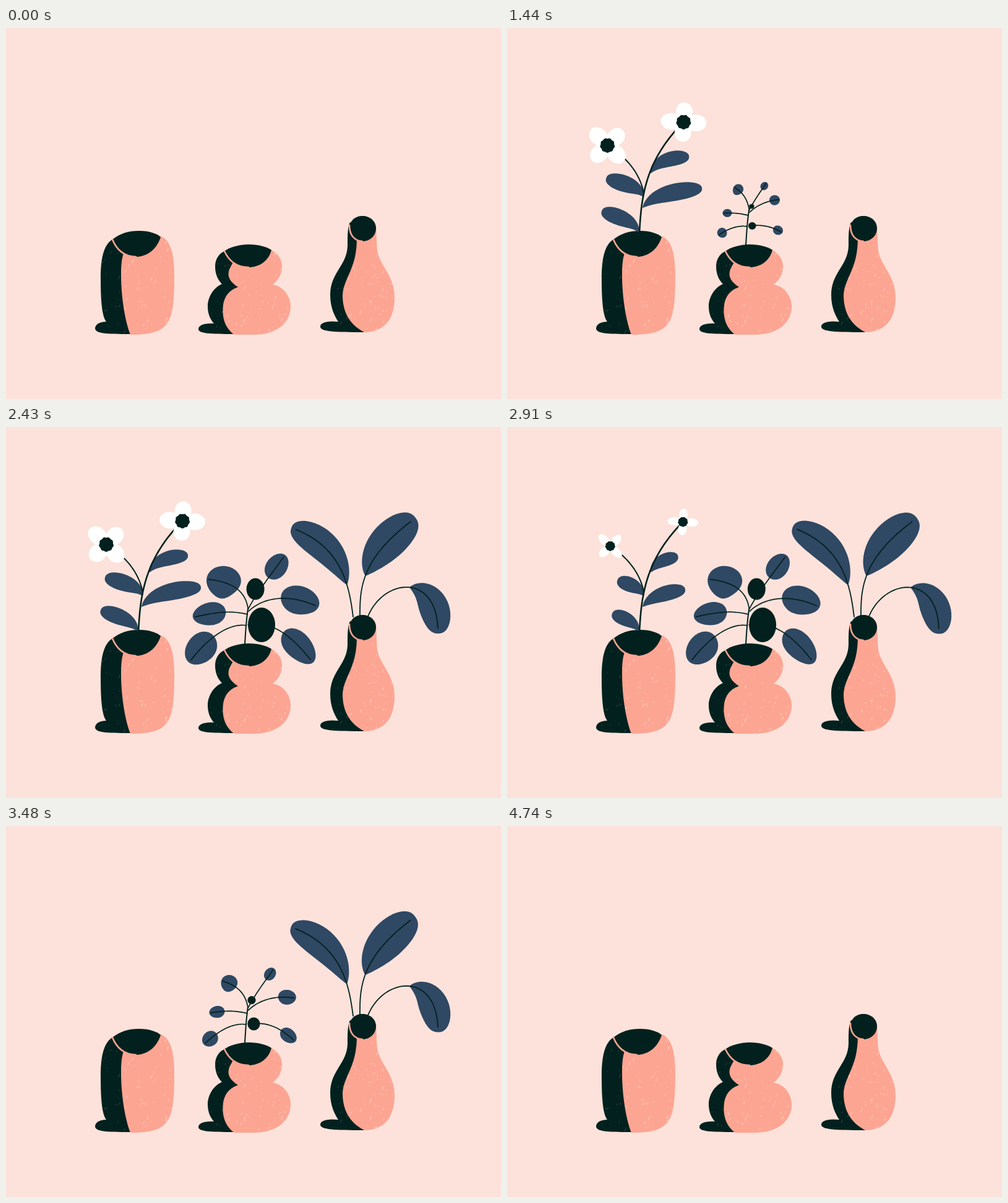
Animation, 800 px wide and 600 px high, one loop 4770 ms. Source, as an HTML page with a canvas:

```html
<!DOCTYPE html>
<html lang="en">
<head>
<meta charset="utf-8">
<title>Three vases</title>
<style>
html, body { margin: 0; width: 100%; height: 100%; overflow: hidden; background: #fce2da; }
canvas { display: block; width: 800px; height: 600px; }
</style>
</head>
<body>
<canvas id="stage" width="800" height="600"></canvas>
<script>
const ctx = document.getElementById('stage').getContext('2d');
const LOOP = 4770;
const CREAM = '#fce2da', DARK = '#02211e', PINK = '#fda593', BLUE = '#2f4863', WHITE = '#fff';

const clamp = x => Math.max(0, Math.min(1, x));
const ease = x => { x = clamp(x); return x * x * (3 - 2 * x); };
const mix = (a, b, k) => a + (b - a) * k;

// Rises from 0 to 1, holds, then falls back to 0.
const phase = (t, inAt, inFor, outAt, outFor) =>
  clamp((t - inAt) / inFor) - clamp((t - outAt) / outFor);

let seed = 7;
const random = () => (seed = (seed * 16807) % 2147483647) / 2147483647;

// ---- Vases ----
const vases = [
  {
    box: [153, 330, 119, 166],
    shade: 'M172 342C157 351 153 375 153 405C153 440 155 466 162 475C150 475 144 480 144 486C145 494 160 495 201 495L215 440L200 350Z',
    face: 'M250 337C264 342 272 360 272 400C272 440 270 464 261 477C251 491 235 496 201 496C191 470 186 430 186 400C186 382 187 374 190 364L230 350Z',
    mouth: 'M172 342C185 332 198 328 215 328C232 328 245 333 250 338C243 360 226 370 210 370C190 370 178 357 172 342Z',
    rim: 'M172 342C178 357 190 370 210 370'
  },
  {
    box: [326, 352, 134, 144],
    shade: 'M353 361C342 366 338 376 338 386C338 400 344 409 349 414C335 420 326 436 326 450C326 462 330 471 336 478C320 477 311 481 311 487C311 494 330 495 369 495L390 440L380 370Z',
    face: 'M429 359C441 366 447 376 446 388C445 402 437 410 431 415C449 418 460 434 460 450C460 475 440 496 400 496L369 496C352 484 349 465 351 448C354 430 364 423 375 419C362 411 358 402 360 394C361 388 365 384 367 378L400 370Z',
    mouth: 'M353 361C362 354 378 350 392 350C408 350 422 354 429 359C424 378 408 387 392 387C372 387 360 376 353 361Z',
    rim: 'M353 361C360 376 372 387 392 387'
  },
  {
    box: [524, 312, 104, 180],
    shade: 'M556 314C552 322 552 335 552 352C551 385 524 395 524 432C524 452 531 466 537 475C517 473 508 477 508 483C508 491 530 492 579 492L590 430L580 330Z',
    face: 'M598 320C599 340 599 350 600 360C604 385 628 400 628 436C628 470 612 492 579 492C552 478 544 455 544 432C546 403 567 390 567 340L580 330Z',
    mouth: 'M555 324C555 312 564 304 576 304C588 304 598 312 598 324C598 336 588 345 576 345C564 345 555 336 555 324Z',
    rim: 'M555 319C555 334 562 344 576 345'
  }
].map(vase => {
  const [x, y, w, h] = vase.box;
  const specks = new Path2D();
  for (let i = 0; i < 75; i++) {
    const px = x + random() * w, py = y + random() * h, size = 0.4 + 4 * random() ** 3;
    specks.moveTo(px, py);
    specks.lineTo(px + size * 0.5, py - size);
  }
  const path = name => new Path2D(vase[name]);
  return { shade: path('shade'), face: path('face'), mouth: path('mouth'), rim: path('rim'), specks };
});

function fill(path, color) {
  ctx.fillStyle = color;
  ctx.fill(path);
}

function speckle(shape, specks, color, width) {
  ctx.save();
  ctx.clip(shape);
  ctx.strokeStyle = color;
  ctx.lineWidth = width;
  ctx.stroke(specks);
  ctx.restore();
}

function drawVase({ shade, face, mouth, rim, specks }) {
  fill(shade, DARK);
  speckle(shade, specks, '#8a655c', 0.5);
  fill(face, PINK);
  speckle(face, specks, CREAM, 0.9);
  fill(mouth, DARK);
  ctx.strokeStyle = PINK;
  ctx.lineWidth = 2.6;
  ctx.stroke(rim);
}

// ---- Plant parts: a spine is a cubic curve [x0, y0, ... x3, y3] ----
function pointOn(s, t) {
  const r = 1 - t;
  const at = i => r * r * r * s[i] + 3 * r * r * t * s[i + 2] + 3 * r * t * t * s[i + 4] + t * t * t * s[i + 6];
  return [at(0), at(1)];
}

function stem(spine, to, width) {
  if (to <= 0) return;
  ctx.beginPath();
  for (let i = 0; i <= 30; i++) ctx.lineTo(...pointOn(spine, to * i / 30));
  ctx.strokeStyle = DARK;
  ctx.lineWidth = width;
  ctx.stroke();
}

// Blade around a stretch of spine; p and q set how blunt its base and tip are.
function leaf(spine, from, to, half, p, q) {
  if (to <= 0 || half <= 0) return;
  const peak = (p / (p + q)) ** p * (q / (p + q)) ** q;
  const left = [], right = [];
  for (let i = 0; i <= 32; i++) {
    const v = (1 - Math.cos(Math.PI * i / 32)) / 2;
    const t = mix(from, to, v);
    const [x, y] = pointOn(spine, t);
    const [ax, ay] = pointOn(spine, t - 0.01), [bx, by] = pointOn(spine, t + 0.01);
    const w = half * v ** p * (1 - v) ** q / peak / Math.hypot(bx - ax, by - ay);
    left.push([x + (by - ay) * w, y - (bx - ax) * w]);
    right.unshift([x - (by - ay) * w, y + (bx - ax) * w]);
  }
  ctx.beginPath();
  for (const point of left.concat(right)) ctx.lineTo(...point);
  ctx.fillStyle = BLUE;
  ctx.fill();
}

function oval(x, y, rx, ry, color, angle = 0) {
  if (rx <= 0 || ry <= 0) return;
  ctx.beginPath();
  ctx.ellipse(x, y, rx, ry, angle, 0, 2 * Math.PI);
  ctx.fillStyle = color;
  ctx.fill();
}

function flower([x, y], k, turn, squash) {
  if (k <= 0) return;
  for (let i = 0; i < 4; i++) {
    const a = turn + i * Math.PI / 2;
    const size = k * (i % 2 ? squash : 1);
    oval(x + Math.cos(a) * 20 * size, y + Math.sin(a) * 20 * size, 17 * size, 13.5 * k ** 1.7, WHITE, a);
  }
  ctx.beginPath();
  for (let a = 0; a < 6.28; a += 0.1) {
    const r = k * (11.5 + 0.5 * Math.sin(9 * a));
    ctx.lineTo(x + r * Math.cos(a), y + r * Math.sin(a));
  }
  ctx.fillStyle = DARK;
  ctx.fill();
}

// ---- Plants ----
const mainStem = [214, 331, 217, 275, 222, 215, 285, 152];
const sideStem = [221, 268, 216, 240, 198, 212, 162, 190];
const flowerLeaves = [
  { spine: [232, 235, 240, 216, 265, 209, 294, 208], half: 12 },
  { spine: [219, 291, 235, 270, 270, 264, 315, 259], half: 14 },
  { spine: [221, 273, 212, 256, 190, 252, 160, 243], half: 13.5 },
  { spine: [213, 330, 205, 312, 180, 306, 153, 296], half: 13 }
];

function drawFlowers(u) {
  const grow = ease((u - 0.1) / 0.9), bloom = ease((u - 0.3) / 0.7);
  const up = ease(u / 0.77), side = ease((u - 0.25) / 0.55);
  for (const { spine, half } of flowerLeaves) leaf(spine, 0, grow, half * Math.sqrt(grow), 0.9, 0.43);
  stem(mainStem, up, 2.6);
  stem(sideStem, side, 2);
  flower(pointOn(sideStem, side), bloom, Math.PI / 4, 0.95);
  flower(pointOn(mainStem, up), bloom, 0.06, 0.86);
}

const trunk = [386, 351, 387, 335, 388, 315, 391, 294];
const roundLeaves = [
  { spine: [391, 293, 386, 262, 362, 250, 324, 246], base: 0.43, half: 26.5 },
  { spine: [390, 303, 365, 297, 345, 298, 302, 308], base: 0.47, half: 18.5 },
  { spine: [388, 321, 365, 317, 330, 335, 296, 381], base: 0.6, half: 23 },
  { spine: [391, 295, 405, 268, 425, 243, 451, 207], base: 0.62, half: 17 },
  { spine: [392, 298, 410, 280, 450, 265, 505, 291], base: 0.58, half: 23 },
  { spine: [391, 320, 425, 316, 452, 325, 496, 381], base: 0.58, half: 21 }
];

function drawRoundPlant(u) {
  const grow = ease(u), reach = ease(u / 0.75);
  stem(trunk, ease(u / 0.2), 2);
  for (const { spine, base, half } of roundLeaves) {
    leaf(spine, reach - (1 - base) * grow, reach, half * grow, 0.5, 0.5);
    stem(spine, reach * 0.97, 1.7);
  }
  oval(mix(391, 403, grow), mix(303, 262, grow), 14.5 * grow ** 1.2, 17.5 * grow ** 1.5, DARK);
  oval(mix(387, 413, grow), 320, 22 * grow ** 1.2, 28 * grow ** 1.5, DARK);
}

const longLeaves = [
  { spine: [561, 307, 555, 262, 546, 193, 461, 163], base: 0.34, half: 24.5 },
  { spine: [572, 306, 572, 262, 572, 212, 662, 147], base: 0.46, half: 29 },
  { spine: [585, 306, 612, 242, 700, 236, 698, 334], base: 0.5, half: 24 }
];

function drawLongPlant(u) {
  const grow = ease(u), reach = ease(u / 0.75);
  for (const { spine, base, half } of longLeaves) {
    leaf(spine, base * reach, reach, half * grow, 0.85, 0.42);
    stem(spine, reach * 0.97, 1.8);
  }
}

const plants = [
  { draw: drawFlowers, root: [214, 330], times: [460, 980, 2740, 640] },
  { draw: drawRoundPlant, root: [386, 350], times: [1160, 700, 3180, 620] },
  { draw: drawLongPlant, root: [572, 306], times: [1620, 720, 3840, 750] }
];

function drawFrame(now) {
  const t = now % LOOP;
  const sway = -0.004 * Math.sin(6 * Math.PI * t / LOOP);
  ctx.fillStyle = CREAM;
  ctx.fillRect(0, 0, 800, 600);
  vases.forEach(drawVase);
  for (const { draw, root: [x, y], times } of plants) {
    const u = phase(t, ...times);
    if (u <= 0) continue;
    ctx.save();
    ctx.translate(x, y);
    ctx.rotate(sway);
    ctx.translate(-x, -y);
    draw(u);
    ctx.restore();
  }
}

ctx.lineCap = ctx.lineJoin = 'round';
const start = performance.now();
function tick() {
  drawFrame(performance.now() - start);
  requestAnimationFrame(tick);
}
tick();
</script>
</body>
</html>
```
